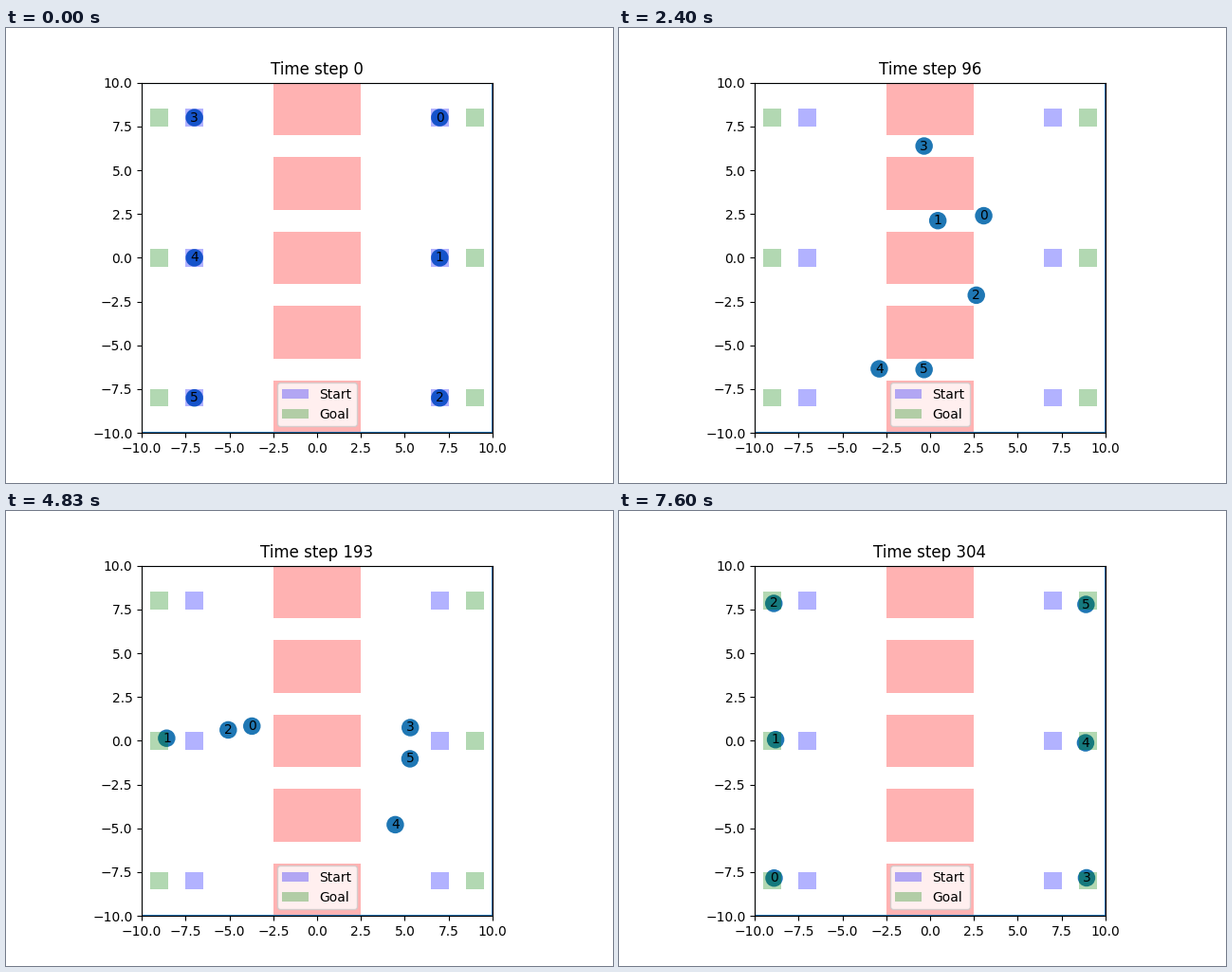
A matplotlib script for the animation above (7.62 s loop, 640x480 px).

```python
import matplotlib.pyplot as plt
import numpy as np
from matplotlib.animation import FuncAnimation
from matplotlib.patches import Circle, Rectangle

STEPS = 305
STEP_MS = 25
INTERVAL = 20
FRAMES = 381

SPEED = 0.1
BRAKE = 0.15
TURN = 3


def hold(trail, until):
    """Wait in place up to the given step."""
    trail += [trail[-1]] * (until + 1 - len(trail))


def go(trail, target, by=None):
    """Move straight to target, at cruise speed or to arrive by a step."""
    here = trail[-1]
    gap = np.subtract(target, here)
    if by is None:
        count = round(np.hypot(*gap) / SPEED)
    else:
        count = by + 1 - len(trail)
    trail += [here + gap * i / count for i in range(1, count + 1)]


def settle(trail, target, tolerance):
    """Cruise to target, braking in proportion to the remaining distance."""
    gap = np.subtract(target, trail[-1])
    while np.hypot(*gap) > tolerance:
        trail.append(trail[-1] + gap * min(SPEED / np.hypot(*gap), BRAKE))
        gap = target - trail[-1]


def drive(side, y, lane, depart, queue=(), dodge=()):
    """Cross from one side through a gap to the opposite goal."""
    trail = [np.array([7.0 * side, y])] * 3
    for step, *point in queue:
        go(trail, point, step)
    settle(trail, (2.62 * side, lane), 0.02)
    hold(trail, depart)
    go(trail, (-2.95 * side, lane))
    hold(trail, len(trail) - 1 + TURN)
    for step, *point in dodge:
        go(trail, point, step)
    settle(trail, (-9 * side, -y), 0.2)
    hold(trail, STEPS - 1)
    return trail[:STEPS]


INNER, OUTER = 2.125, 6.375
paths = [
    drive(1, 8, INNER, 119, queue=[(68, 3.9, 3.46), (96, 3.06, 2.4)]),
    drive(1, 0, INNER, 74),
    drive(1, -8, -INNER, 99, queue=[(68, 3.43, -2.71)], dodge=[(193, -5.07, 0.62)]),
    drive(-1, 8, OUTER, 73),
    drive(
        -1, 0, -OUTER, 113,
        queue=[(68, -4.2, -5.12), (96, -2.9, -6.34)],
        dodge=[(193, 4.46, -4.79), (251, 7.03, -1.76)],
    ),
    drive(-1, -8, -OUTER, 73, dodge=[(193, 5.3, -1.03), (251, 6.64, 3.21)]),
]

fig, ax = plt.subplots(figsize=(6.4, 4.8), dpi=100)
ax.set_aspect("equal")
ax.set_xlim(-10, 10)
ax.set_ylim(-10, 10)
ax.plot([-10, 10, 10, -10, -10], [-10, -10, 10, 10, -10], color="C0")


def add_box(x, y, w, h, color, label=None):
    box = Rectangle((x, y), w, h, color=color, alpha=0.3, lw=0, label=label)
    return ax.add_patch(box)


for low in np.arange(-10, 8, 4.25):
    add_box(-2.5, low, 5, 3, "red")

for column, color, name in ((7, "blue", "Start"), (9, "green", "Goal")):
    for x in (-column, column):
        for y in (8, 0, -8):
            first = x < 0 and y == 8
            add_box(x - 0.5, y - 0.5, 1, 1, color, name if first else None)

ax.legend(loc="lower center")
title = ax.set_title("Time step 0")

discs = [ax.add_patch(Circle(p[0], 0.5, fc="C0", lw=0, zorder=0.9)) for p in paths]
tags = [
    ax.text(*p[0], str(i), ha="center", va="center") for i, p in enumerate(paths)
]


def update(frame):
    step = (frame * INTERVAL + INTERVAL // 2) // STEP_MS
    title.set_text(f"Time step {step}")
    for path, disc, tag in zip(paths, discs, tags):
        disc.center = path[step]
        tag.set_position(path[step])
    return [title, *discs, *tags]


anim = FuncAnimation(fig, update, frames=FRAMES, interval=INTERVAL, repeat=True)
plt.show()
```
